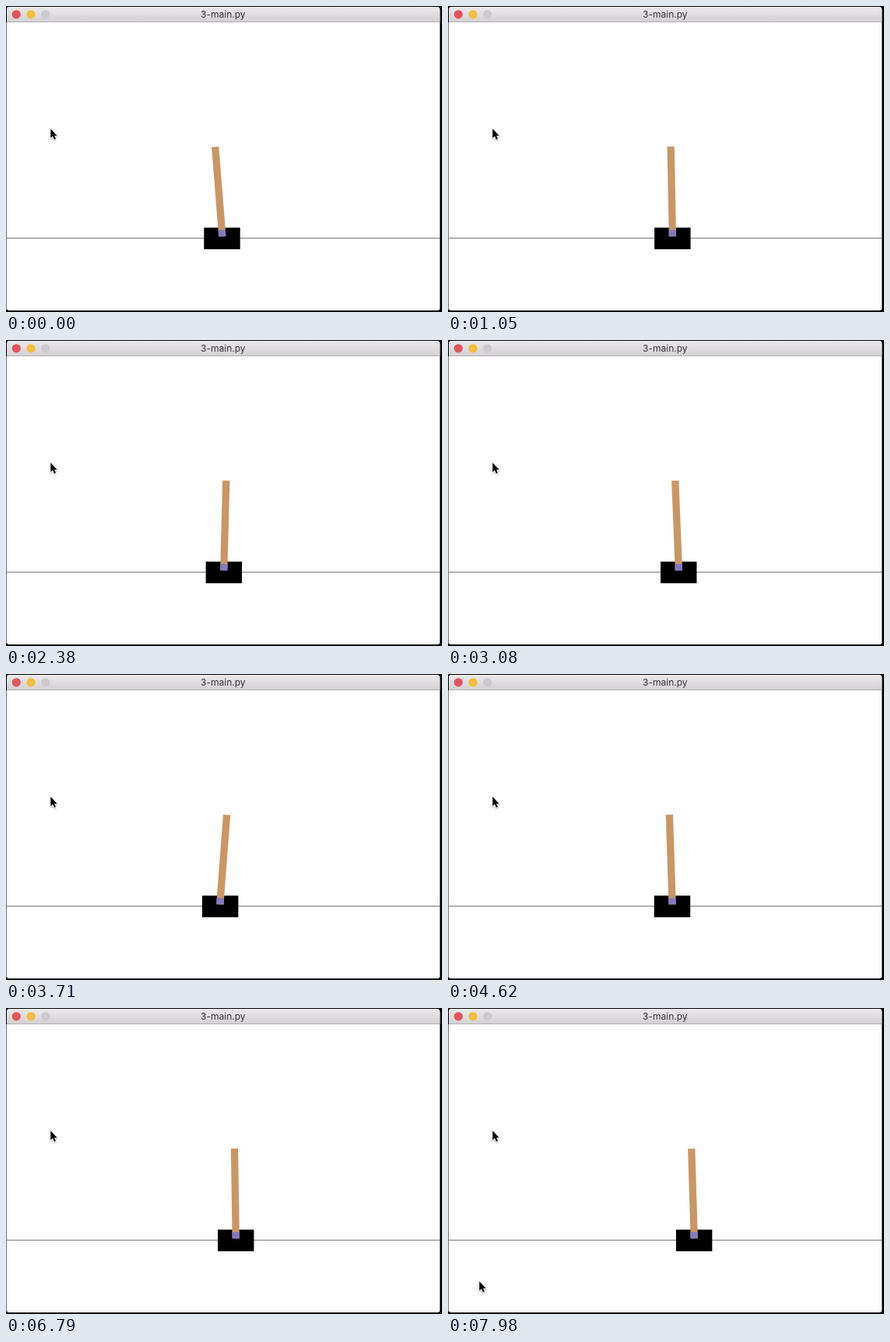
An HTML page with a canvas for the animation above (8000 ms loop, 560 px wide and 394 px high).

```html
<!DOCTYPE html>
<html>
<head>
<meta charset="utf-8">
<style>
  html, body { margin: 0; width: 100%; height: 100%; overflow: hidden; background: #000; }
  canvas { display: block; }
</style>
</head>
<body>
<canvas id="stage" width="560" height="394"></canvas>
<script>
const ctx = document.getElementById('stage').getContext('2d');
const LOOP = 8000, STEP = 70;
const CART = { width: 46.4, height: 27.8, top: 285.4 };
const POLE = { width: 9.3, reach: 111.4, pivotY: 292.4 };

// Turning points of the swing; tip is the sideways offset of the pole's end
const turns = [
  { at: 490, x: 277.5, tip: -8.8 },
  { at: 1400, x: 293.5, tip: 0.9 },
  { at: 2170, x: 273.5, tip: 6 },
  { at: 2820, x: 300.4, tip: -7 },
  { at: 3810, x: 274.5, tip: 8.8 },
  { at: 4720, x: 288.4, tip: -4 },
  { at: 5530, x: 279.5, tip: 3 },
  { at: 6790, x: 295.2, tip: -1.7 },
  { at: 7980, x: 316.1, tip: -3.4 }
];

// Cosine swing from one turning point to the next
function poseAt(time) {
  const next = Math.max(1, turns.findIndex(turn => turn.at >= time));
  const from = turns[next - 1], to = turns[next];
  const progress = Math.max(0, (time - from.at) / (to.at - from.at));
  const eased = (1 - Math.cos(Math.PI * progress)) / 2;
  const mix = key => from[key] + (to[key] - from[key]) * eased;
  return { x: mix('x'), tip: mix('tip') };
}

function rect(color, x, y, w, h) {
  ctx.fillStyle = color;
  ctx.fillRect(x, y, w, h);
}

function drawWindow() {
  rect('#000', 0, 0, 560, 394);
  rect('#777', 0, 21, 1, 370);
  ctx.save();
  ctx.beginPath();
  ctx.roundRect(1, 1, 556.3, 391, [4, 4, 3, 3]);
  ctx.clip();
  rect('#fefefe', 1, 1, 557, 391);
  const bar = ctx.createLinearGradient(0, 1, 0, 21);
  bar.addColorStop(0, '#ebe9eb');
  bar.addColorStop(1, '#d2d0d2');
  rect(bar, 1, 1, 557, 19);
  rect('#b4b2b4', 1, 20, 557, 1);
  ctx.restore();

  ['#e0545c', '#f2bd41', '#cccacc'].forEach((color, i) => {
    ctx.beginPath();
    ctx.arc(13.3 + 18.7 * i, 10.8, 5.6, 0, 2 * Math.PI);
    ctx.fillStyle = color;
    ctx.fill();
  });

  ctx.fillStyle = '#383838';
  ctx.font = '12px Inter, sans-serif';
  ctx.textAlign = 'center';
  ctx.fillText('3-main.py', 278.8, 15.3);
}

function drawCartPole({ x, tip }) {
  rect('#6a6a6a', 1, 298.5, 556.3, 1);
  rect('#000', x - CART.width / 2, CART.top, CART.width, CART.height);
  ctx.save();
  ctx.translate(x, POLE.pivotY);
  ctx.rotate(Math.asin(tip / POLE.reach));
  const half = POLE.width / 2;
  rect('#c99766', -half, -POLE.reach, POLE.width, POLE.reach + 4.3);
  rect('#8579c3', -half, -4, POLE.width, 8.3);
  ctx.restore();
}

function drawCursor(x, y) {
  ctx.save();
  ctx.translate(x, y);
  ctx.scale(0.93, 0.93);
  const arrow = new Path2D('M0 0V13L3 10.3L5 15L7.2 14.1L5.2 9.6H9Z');
  ctx.shadowColor = 'rgba(0,0,0,.3)';
  ctx.shadowBlur = 2;
  ctx.shadowOffsetY = 1;
  ctx.strokeStyle = '#fff';
  ctx.lineWidth = 1.8;
  ctx.stroke(arrow);
  ctx.shadowColor = 'transparent';
  ctx.fillStyle = '#000';
  ctx.fill(arrow);
  ctx.restore();
}

function draw() {
  const elapsed = performance.now() % LOOP;
  const time = Math.floor(elapsed / STEP) * STEP;
  drawWindow();
  drawCartPole(poseAt(time));
  drawCursor(57.3, 158);
  if (time >= 7910) drawCursor(40.3, 352);
  requestAnimationFrame(draw);
}
draw();
</script>
</body>
</html>
```
